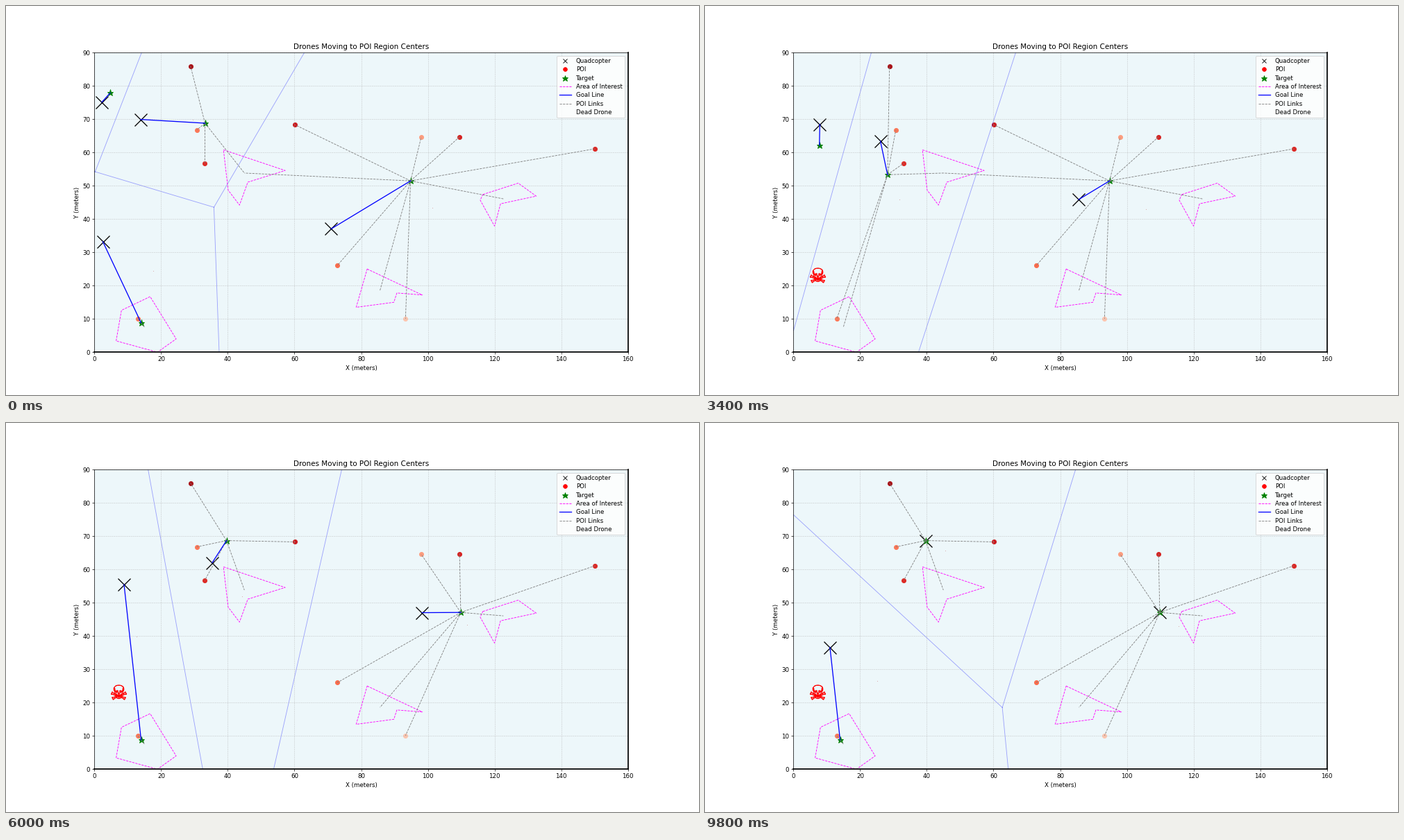
A matplotlib script for the animation above (10000 ms loop, 998 by 561 pixels).

```python
import numpy as np
import matplotlib.pyplot as plt
from matplotlib.animation import FuncAnimation
from matplotlib.lines import Line2D

W, H = 160, 90
DPI = 62.375
FRAMES, INTERVAL = 50, 200
LOST, LOST_AT = 2, 12      # the drone that fails, and the first step without it
AREA_WEIGHT = .4

START = np.array([(1.55, 74.4), (12.85, 70), (2.1, 34.1), (70.15, 36.55)])

# x, y, weight
POIS = [
    (28.8, 86, .85), (30.7, 66.8, .4), (33.1, 56.8, .65), (60.2, 68.3, .72),
    (98, 64.6, .27), (109.5, 64.7, .68), (150, 61.1, .66), (72.8, 26, .44),
    (93.3, 10.1, .13), (13, 10.1, .4),
]

AREAS = [np.array(a) for a in (
    [(6.5, 3.4), (8.1, 12.6), (16.7, 16.7), (24.5, 4), (18.9, 0)],
    [(38.7, 60.8), (57.2, 54.6), (46, 51.1), (43.5, 44.2), (40.1, 48.7)],
    [(116.5, 47.4), (127.1, 50.8), (132.5, 46.9), (121.8, 44.6), (120, 37.9),
     (115.7, 45.7)],
    [(81.8, 25), (98.3, 17.2), (90.7, 17.8), (89.8, 15), (78.5, 13.5)],
)]


def planes(i, ids, pos):
    """Half-planes n.x <= c that bound the cell of drone i."""
    out = [((-1, 0), 0), ((1, 0), W), ((0, -1), 0), ((0, 1), H)]
    for j in ids:
        if j != i:
            n = pos[j] - pos[i]
            out.append((n, n @ (pos[i] + pos[j]) / 2))
    return out


def cell(i, ids, pos):
    poly = [np.array(p, float) for p in ((0, 0), (W, 0), (W, H), (0, H))]
    for n, c in planes(i, ids, pos)[4:]:
        kept = []
        for a, b in zip(poly, poly[1:] + poly[:1]):
            da, db = n @ a - c, n @ b - c
            if da <= 0:
                kept.append(a)
            if da * db < 0:
                kept.append(a + (b - a) * da / (da - db))
        poly = kept
    return np.array(poly)


def centroid(poly):
    nxt = np.roll(poly, -1, axis=0)
    cross = poly[:, 0] * nxt[:, 1] - nxt[:, 0] * poly[:, 1]
    return ((poly + nxt) * cross[:, None]).sum(0) / (3 * cross.sum())


def border(i, j, ids, pos):
    """Part of the bisector of i and j that lies on their cells."""
    mid = (pos[i] + pos[j]) / 2
    dx, dy = pos[j] - pos[i]
    d = np.array([-dy, dx]) / np.hypot(dx, dy)
    lo, hi = -1e3, 1e3
    for n, c in planes(i, ids, pos):
        slope, room = np.dot(n, d), c - np.dot(n, mid)
        if slope > 1e-9:
            hi = min(hi, room / slope)
        elif slope < -1e-9:
            lo = max(lo, room / slope)
    return (mid + lo * d, mid + hi * d) if lo < hi else None


def nearest(p, ids, pos):
    return min(ids, key=lambda i: np.hypot(*(pos[i] - p)))


def assign(ids, pos):
    """Points of interest per drone; an area counts for every cell it touches."""
    jobs = {i: [] for i in ids}
    for x, y, w in POIS:
        jobs[nearest((x, y), ids, pos)].append((x, y, w))
    for area in AREAS:
        for i in {nearest(p, ids, pos) for p in area}:
            jobs[i].append((*centroid(area), AREA_WEIGHT))
    return jobs


def simulate():
    pos, steps = START, []
    for k in range(FRAMES):
        ids = [i for i in range(4) if i != LOST or k < LOST_AT]
        jobs = assign(ids, pos)
        mids = {i: centroid(cell(i, ids, pos)) for i in ids}
        edges = [border(i, j, ids, pos) for i in ids for j in ids if i < j]
        goals = dict(mids)
        old, pos = pos, pos.copy()
        for i in ids:
            if jobs[i]:
                a = np.array(jobs[i])
                goals[i] = a[:, 2] @ a[:, :2] / a[:, 2].sum()
            gap = goals[i] - old[i]
            pos[i] += gap / max(1, np.hypot(*gap))
        steps.append((ids, pos, jobs, goals, mids, [e for e in edges if e]))
    return steps


STEPS = simulate()

fig, ax = plt.subplots(figsize=(998.001 / DPI, 561.001 / DPI), dpi=DPI)
fig.subplots_adjust(left=127.4 / 998, right=895.6 / 998)
ax.set(xlim=(0, W), ylim=(0, H), facecolor="#edf7fa",
       title="Drones Moving to POI Region Centers",
       xlabel="X (meters)", ylabel="Y (meters)")
ax.grid(True, ls="--", lw=.6, color="#b0b0b0", alpha=.7)
for side in ("right", "bottom"):
    ax.spines[side].set_linewidth(2)

for area in AREAS:
    ax.plot(*np.vstack([area, area[:1]]).T, "--", color="magenta", lw=1)
for x, y, w in POIS:
    ax.plot(x, y, "o", color=plt.cm.Reds(.1 + .9 * w), ms=7.1, zorder=1.1)

ax.legend(loc="upper right", labelspacing=.38, handles=[
    Line2D([], [], ls="", marker="x", color="k", ms=8, label="Quadcopter"),
    Line2D([], [], ls="", marker="o", color="r", ms=6.5, label="POI"),
    Line2D([], [], ls="", marker="*", color="g", ms=10, label="Target"),
    Line2D([], [], ls="--", color="magenta", lw=1, label="Area of Interest"),
    Line2D([], [], color="b", lw=1.5, label="Goal Line"),
    Line2D([], [], ls="--", color="gray", lw=1, label="POI Links"),
    Line2D([], [], ls="", label="Dead Drone"),
])

live = []


def add(points, fmt="-", **style):
    live.extend(ax.plot(*np.transpose(points), fmt, **style))


def reset():
    while live:
        live.pop().remove()
    return []


def draw(k):
    reset()
    ids, pos, jobs, goals, mids, edges = STEPS[k]
    for e in edges:
        add(e, color="blue", alpha=.35, lw=1, zorder=1.5)
    add(list(mids.values()), "o", color="#d8a8a8", ms=1.1, mew=0, zorder=1)
    for i in ids:
        add([pos[i]], "x", color="k", ms=20, mew=1.5, zorder=1.05)
        add([goals[i]], "*", color="g", ms=10.5, zorder=1.2)
        for x, y, _ in jobs[i]:
            add([goals[i], (x, y)], "--", color="gray", lw=1, zorder=2)
        add([pos[i], goals[i]], color="b", lw=1.5, zorder=2.1)
    if LOST not in ids:
        add([pos[LOST]], "", ls="", marker="$\u2620$", color="r", ms=26,
            mew=.8, zorder=3)
    return live


anim = FuncAnimation(fig, draw, frames=FRAMES, init_func=reset,
                     interval=INTERVAL, repeat=True, repeat_delay=0, blit=False)
plt.show()
```
